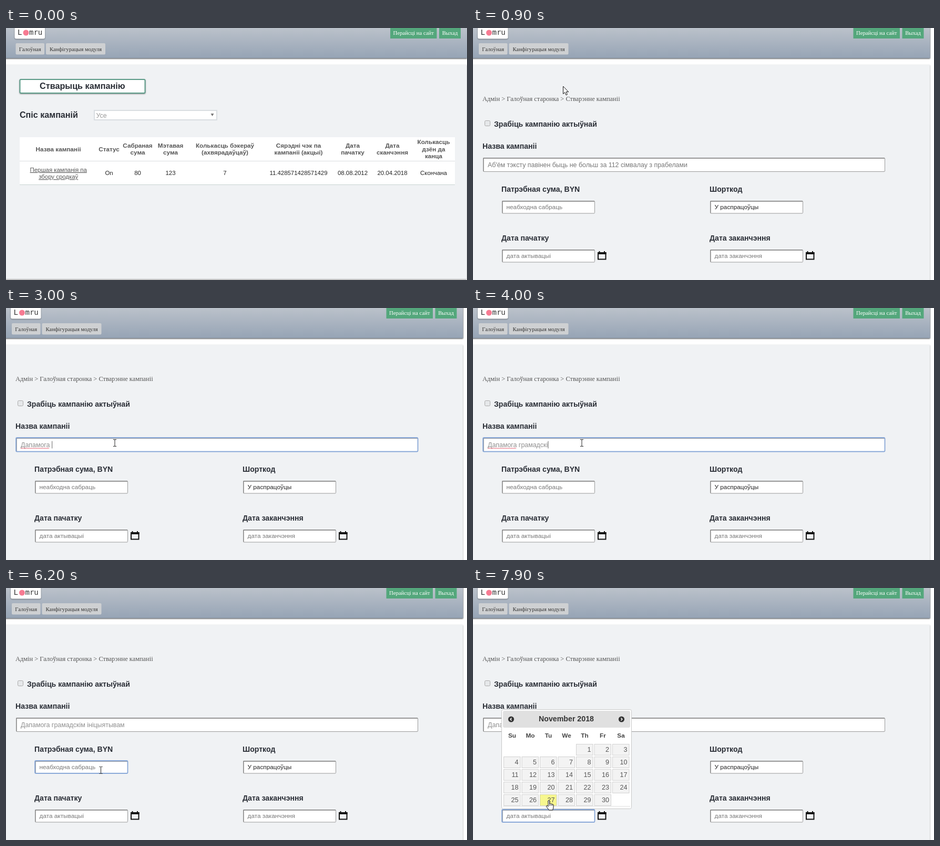
An HTML page for the animation above (8000 ms loop, 877 by 480 pixels).

```html
<!DOCTYPE html>
<html lang="be">
<head>
<meta charset="utf-8">
<style>
html, body { margin: 0; width: 100%; height: 100%; overflow: hidden; background: #fff; }
svg { display: block; width: 877px; height: 480px; font-family: "Liberation Sans", Arial, sans-serif; }
text { white-space: pre; }
.b { font-weight: bold; }
.serif { font-family: "Liberation Serif", "Times New Roman", serif; }
.mono { font-family: "DejaVu Sans Mono", monospace; }
.mid { text-anchor: middle; }
.end { text-anchor: end; }
.link { text-decoration: underline; }
.bar { filter: drop-shadow(0 1px 1px #444); }
.panel { filter: drop-shadow(.5px 1.5px 1px #888); }
.lift { filter: drop-shadow(0 1px 1px #0006); }
</style>
</head>
<body>
<svg id="stage" viewBox="0 0 877 480">
  <defs>
    <linearGradient id="sky" x2="0" y2="1">
      <stop stop-color="#bec4cc"/><stop offset="1" stop-color="#96a4b5"/>
    </linearGradient>
  </defs>
</svg>
<script>
const $ = id => document.getElementById(id);
const DARK = '#292d35', GREY = '#777', PANEL = '#f0f2f4';

const text = (s, x, y, size, fill = DARK, cls = '', id = '') =>
  `<text id="${id}" x="${x}" y="${y}" font-size="${size}" fill="${fill}" class="${cls}">${s}</text>`;
const rect = (x, y, w, h, fill, more = '') =>
  `<rect x="${x}" y="${y}" width="${w}" height="${h}" fill="${fill}" ${more}/>`;
const path = (d, more = '') => `<path d="${d}" ${more}/>`;
const group = (id, body) => `<g id="${id}">${body}</g>`;

// Centred lines stacked around a middle height
const lines = (s, x, y, size, fill, cls) => s.split('|').map((line, i, all) =>
  text(line, x, y + (i - (all.length - 1) / 2) * 13.3, size, fill, 'mid ' + cls)).join('');

function header() {
  const nav = (s, x, w) => rect(x, 29, w, 21.5, '#ced0d2', 'rx="2"') +
    text(s, x + w / 2, 43.5, 10.6, '#333', 'serif mid');
  const action = (s, x, w) => rect(x, -3, w, 23, '#54a77c') +
    text(s, x + w / 2, 13, 10.7, '#fff', 'serif mid');
  return rect(-10, -5, 887, 62.5, 'url(#sky)', 'class="bar"') +
    rect(16.5, -8, 57.5, 28.5, '#fff', 'rx="3" class="lift"') +
    text('L', 22, 12.5, 14, '#333', 'mono') + text('mru', 44, 12.5, 14, '#333', 'mono') +
    '<circle cx="38" cy="9" r="5.5" fill="#f77b92"/>' +
    nav('Галоўная', 18.5, 54.5) + nav('Канфігурацыя модуля', 76, 113) +
    action('Перайсці на сайт', 731, 88.5) + action('Выхад', 824, 41);
}
const page = (dx, bottom) =>
  rect(-10, 70, 886.5 + dx, bottom - 70, PANEL, 'class="panel"') +
  `<g transform="translate(${dx})">${header()}</g>`;

function listPage() {
  const columns = [
    [99.5, 'Назва кампаніі', ''], [196, 'Статус', 'On'], [250.5, 'Сабраная|сума', '80'],
    [313, 'Мэтавая|сума', '123'], [416.5, 'Колькасць бэкераў|(ахвярадаўцаў)', '7'],
    [556.5, 'Сярэдні чэк па|кампаніі (акцыі)', '11.428571428571429'],
    [659.5, 'Дата|пачатку', '08.08.2012'], [735, 'Дата|сканчэння', '20.04.2018'],
    [813.5, 'Колькасць|дзён да|канца', 'Скончана']];
  return page(0, 478) +
    rect(26.5, 98, 238, 26, '#fff', 'rx="2" stroke="#5b9b88" stroke-width="2" class="lift"') +
    text('Стварыць кампанію', 145.3, 116, 16.2, DARK, 'b mid') +
    text('Спіс кампаній', 26, 171, 16.1, DARK, 'b') +
    rect(168, 157, 233, 18, '#fff', 'stroke="#d9dde1" stroke-width="2"') +
    text('Усе', 171.5, 171, 12.4, '#999') +
    path('M389.5 163h6l-3 5z', 'fill="#777"') +
    rect(26, 208, 828, 90, '#fff') + rect(26, 253, 828, 1, '#d9dcdf') + rect(26, 298, 828, 1, '#c8d4d2') +
    columns.map(([x, head, cell]) =>
      lines(head, x, 234.7, 11.7, '#555', 'b') + lines(cell, x, 279.7, 11.4, '#222', '')).join('') +
    lines('Першая кампанія па|збору сродкаў', 99.7, 280.5, 11.4, '#555', 'link');
}

const box = (x, y, w, h) =>
  rect(x + .5, y + .5, w - 1, h - 1, '#fff', 'rx="1.5" stroke="#999"') +
  path(`M${x + 1} ${y + h - 1}V${y + 1}H${x + w - 1}`, 'fill="none" stroke="#858585" stroke-width="1.3"');
const focusRing = (id, x, y, w, h) => group(id,
  rect(x, y, w, h, 'none', 'rx="2" stroke="#7fa4dc" stroke-width="1.8" opacity=".85"'));

function formPage() {
  const field = (label, x, y, hint, fill = GREY, id = '') =>
    text(label, x - 1, y - 17, 14.1, DARK, 'b') + box(x, y, 177, 24.5) +
    text(hint, x + 8.5, y + 16, 11.8, fill, '', id);
  const icon = x => path(`M${x + 1} 428h14.5v12.5h-14.5z`, `fill="${PANEL}" stroke="#111" stroke-width="2"`) +
    path(`M${x} 427h16.5v4h-16.5zM${x + 2.5} 425h2v3h-2zM${x + 12} 425h2v3h-2z`, 'fill="#111"');
  return page(-7.5, 520) +
    text('Адмін &gt; Галоўная старонка &gt; Стварэнне кампаніі', 18, 139, 12.4, '#555', 'serif') +
    rect(22.5, 176.5, 10, 10, '#e6e8ea', 'rx="2" stroke="#aaa"') +
    text('Зрабіць кампанію актыўнай', 40, 188, 14.1, DARK, 'b') +
    text('Назва кампаніі', 18, 230, 14.1, DARK, 'b') +
    box(19, 247, 765, 27) +
    text("Аб'ём тэксту павінен быць не больш за 112 сімвалау з прабелами", 28, 265, 12.4, GREY, '', 'nameHint') +
    text('', 28, 265, 12.4, '#8e8e8e', '', 'name') +
    path('', 'id="waves" fill="none" stroke="#e0455a" stroke-width=".9"') +
    field('Патрэбная сума, BYN', 55, 329, 'неабходна сабраць', GREY, 'sumHint') +
    text('', 63.5, 345, 11.8, GREY, '', 'sum') +
    field('Шорткод', 451, 329, 'У распрацоўцы', '#222') +
    field('Дата пачатку', 55, 422, 'дата актывацыі') + icon(237) +
    field('Дата заканчэння', 451, 422, 'дата заканчэння') + icon(633) +
    focusRing('nameFocus', 19, 247, 764.5, 26.5) +
    focusRing('sumFocus', 55, 329, 176.5, 24) +
    focusRing('dateFocus', 55, 422, 176.5, 24) +
    rect(0, 0, 1, 14, '#666', 'id="caret"');
}

function calendar() {
  const arrow = (x, dir) => `<circle cx="${x}" cy="250" r="5.6" fill="#333"/>` +
    path(`M${x - dir} 247.5l${2.4 * dir} 2.5l${-2.4 * dir} 2.5`, 'fill="none" stroke="#fff" stroke-width="1.5"');
  let out = rect(54.5, 231.5, 247, 189, '#fff', 'rx="3" stroke="#c8c8c8"') +
    rect(57, 234, 242, 32, '#e0e0e0', 'rx="3"') + arrow(72.5, -1) + arrow(282.5, 1) +
    text('November 2018', 177.5, 254, 14.2, '#333', 'b mid') +
    rect(57, 415.5, 242, 1, '#ddd');
  'Su Mo Tu We Th Fr Sa'.split(' ').forEach((d, i) => out += text(d, 74.5 + i * 34.5, 285, 11.8, '#444', 'b mid'));
  for (let day = 1; day <= 30; day++) {
    const col = (day + 3) % 7, row = Math.floor((day + 3) / 7);
    const x = 58.5 + col * 34.5, y = 297.5 + row * 24;
    out += rect(x, y, 31.5, 21, '#f3f3f3', 'stroke="#d2d2d2"');
    if (day == 27) out += rect(x, y, 31.5, 21, '#f7f78e', 'id="pick" stroke="#bbb" stroke-dasharray="1 1"');
    out += text(day, x + 28, y + 14.7, 12.6, '#555', 'end');
  }
  return out;
}

const pointers =
  group('arrow', path('M.5 0v14.5l3.2-3 2.3 5.2 2.4-1-2.3-5h4.6z', 'fill="#fff" stroke="#111"')) +
  group('beam', path('M-3-6.5h2q1 0 1 1v11q0 1-1 1h-2M3-6.5h-2q-1 0-1 1M3 6.5h-2q-1 0-1-1', 'fill="none" stroke="#222"')) +
  group('hand', path('M-1 0Q.3-1.6 1.6 0V6Q3 4.8 4.3 6.3 5.8 5.4 6.9 7 8.6 6.5 9 8.2V13L7.6 18H.6L-4.4 11.3Q-4.6 9-2.6 9.6L-1 11.3z',
    'fill="#fff" stroke="#111" stroke-linejoin="round"') + path('M1.6 6v4M4.3 6.5v3.5M6.9 7v3', 'stroke="#111" stroke-width=".8"'));

$('stage').innerHTML += group('list', listPage()) + group('form', formPage()) +
  group('calendar', calendar()) + group('pointer', pointers);

const NAME = 'Дапамога грамадскім ініцыятывам', SUM = '1000';
const ROUTE = [[100, 255, 165], [350, 171, 111], [900, 171, 111], [1450, 207, 257], [5400, 207, 257],
  [6000, 180.5, 347], [6800, 180.5, 347], [7200, 150, 434], [7400, 150, 434], [7750, 144, 405]];

const show = (id, on) => $(id).style.display = on ? '' : 'none';
const clamp = (v, max) => Math.max(0, Math.min(max, v));

function position(t) {
  const i = ROUTE.findIndex(p => p[0] > t);
  if (i < 1) return ROUTE[i ? ROUTE.length - 1 : 0].slice(1);
  const [t0, x0, y0] = ROUTE[i - 1], [t1, x1, y1] = ROUTE[i];
  const u = (t - t0) / (t1 - t0), k = u * u * (3 - 2 * u);
  return [x0 + (x1 - x0) * k, y0 + (y1 - y0) * k];
}

function wave(from, to) {
  const el = $('name'), x = 28 + (from && el.getSubStringLength(0, from));
  return `M${x} 268` + 'l1.5 -1.5l1.5 1.5'.repeat(el.getSubStringLength(from, to - from) / 3);
}

function draw(t) {
  const onList = t < 400, onForm = t >= 900, open = t >= 7300;
  show('list', onList);
  show('form', onForm);
  show('calendar', open);
  $('calendar').style.opacity = clamp((t - 7250) / 200, 1);

  const typed = clamp(Math.floor((t - 2050) / 105), NAME.length);
  const digits = clamp(Math.floor((t - 6300) / 110), SUM.length);
  const inName = t >= 1600 && t < 6050, inSum = t >= 6050 && t < 7250;
  $('name').textContent = NAME.slice(0, typed);
  $('sum').textContent = SUM.slice(0, digits);
  show('nameHint', !typed);
  show('sumHint', !digits);
  show('nameFocus', inName);
  show('sumFocus', inSum);
  show('dateFocus', t >= 7250);

  if (onForm) {
    $('waves').setAttribute('d', inName ? (typed > 8 ? wave(0, 8) : '') + (typed > 19 ? wave(9, 19) : '') : '');
    const end = inName ? 28 + $('name').getComputedTextLength() : 63.5 + $('sum').getComputedTextLength();
    $('caret').setAttribute('transform', `translate(${end + .3} ${inName ? 253.5 : 334})`);
    show('caret', inName && t < 5800 || inSum && digits && t < 7100);
  }

  const [x, y] = position(t);
  const within = (a, b) => y >= a && y <= b;
  const overField = onForm && (within(247, 274) || within(329, 353) || within(422, 446));
  const hand = onList && y < 125 || t >= 7550;
  const beam = !hand && overField && !(open && y < 421);
  show('pointer', t >= 100);
  $('pointer').setAttribute('transform', `translate(${x} ${y})`);
  show('hand', hand);
  show('beam', beam);
  show('arrow', !hand && !beam);
  show('pick', t >= 7650);
}

function tick() {
  draw(performance.now() % 8000);
  requestAnimationFrame(tick);
}
tick();
</script>
</body>
</html>
```
